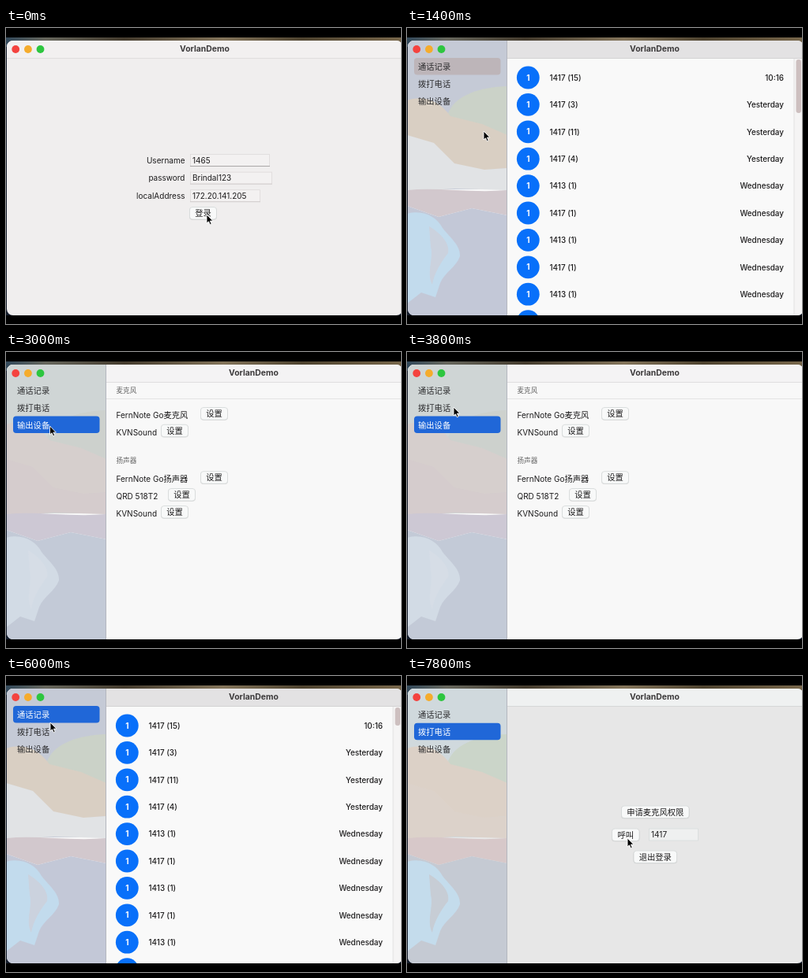
Animation of 500 by 376 pixels, one loop 8000 ms. Source, as an HTML page:

```html
<!DOCTYPE html>
<html lang="zh-CN">
<head>
<meta charset="utf-8">
<title>VorlanDemo</title>
<style>
  html, body { margin: 0; width: 100%; height: 100%; overflow: hidden; background: #000; }
  svg { display: block; width: 100%; height: 100%; }
  text { font: 10px Inter, "Noto Sans CJK SC", "Noto Sans CJK", sans-serif; fill: #1c1b1c; }
  .cjk { font-size: 10.3px; font-family: "Noto Sans CJK SC", "Noto Sans CJK", sans-serif; }
  .title { font-size: 10.4px; font-weight: 700; fill: #3c3a3b; text-anchor: middle; }
  .head { font-size: 8.6px; fill: #656565; }
  .mid { text-anchor: middle; }
  .end { text-anchor: end; }
  .row { font-size: 9.9px; font-weight: 500; }
  .badge { font-weight: 700; fill: #fff; text-anchor: middle; }
</style>
</head>
<body>
<svg viewBox="0 0 500 376" preserveAspectRatio="none">
  <defs>
    <linearGradient id="wall">
      <stop offset="0" stop-color="#32495b"/>
      <stop offset=".1" stop-color="#66665c"/>
      <stop offset=".3" stop-color="#443b2d"/>
      <stop offset=".55" stop-color="#83745a"/>
      <stop offset=".75" stop-color="#4e432f"/>
      <stop offset="1" stop-color="#77664a"/>
    </linearGradient>
    <clipPath id="frame"><rect x="1" y="16" width="501" height="349" rx="8"/></clipPath>
    <clipPath id="side"><rect x="1" y="16" width="125" height="349"/></clipPath>
  </defs>
  <rect width="500" height="376"/>
  <rect y="12" width="500" height="12" fill="url(#wall)"/>
  <rect y="24" width="500" height="341" fill="#141c2b"/>
  <g clip-path="url(#frame)">
    <g id="pages"></g>
    <g id="sidebar">
      <g id="scene" clip-path="url(#side)"></g>
      <rect x="126" y="16" width="1" height="349" fill="#b4b7bf"/>
      <rect id="pick" x="9" width="109.5" height="21.5" rx="4"/>
      <g id="menu"></g>
    </g>
    <circle cx="12.2" cy="27" r="4.9" fill="#f4433f"/>
    <circle cx="27.9" cy="27" r="4.9" fill="#f5ac2c"/>
    <circle cx="43.5" cy="27" r="4.9" fill="#2dc63f"/>
  </g>
  <path id="cursor" d="M0 0V11L2.5 8.8L4.3 12.8L6.2 12L4.4 8.1H7.9Z" fill="#000" stroke="#fff" stroke-width=".9" stroke-linejoin="round"/>
</svg>
<script>
const LOOP = 8000, STEP = 200;
const $ = id => document.getElementById(id);
const rect = (x, y, w, h, fill, more = '') =>
  `<rect x="${x}" y="${y}" width="${w}" height="${h}" fill="${fill}" ${more}/>`;
const text = (x, y, str, cls = '') => `<text x="${x}" y="${y}" class="${cls}">${str}</text>`;

const button = (x, y, w, label, id = '') =>
  rect(x, y + .8, w, 16, '#000', 'rx="4" opacity=".13"') +
  rect(x + .5, y + .5, w - 1, 15.5, '#f8f9f9', `rx="3.5" stroke="#d5d8d9" stroke-width=".8" ${id}`) +
  text(x + w / 2, y + 12, label, 'cjk mid');

const field = (x, y, w, value, fill, edge) =>
  rect(x + .5, y + .5, w - 1, 15, fill, `stroke="${edge}" stroke-width=".8"`) +
  text(x + 3, y + 11.6, value);

const shell = (bar, body, line, titleX) =>
  rect(1, 16, 500, 349, body) + rect(1, 16, 500, 22, bar) +
  rect(1, 38, 500, 1, line) + text(titleX, 30.4, 'VorlanDemo', 'title');

function loginPage() {
  const rows = [['Username', '1465', 101], ['password', 'Brindal123', 104], ['localAddress', '172.20.141.205', 89]];
  return shell('#f2f0f0', '#f0eeee', '#e0dede', 251.5) +
    rows.map(([name, value, w], i) => {
      const y = 160 + i * 22.6;
      return text(226.5, y + 11.6, name, 'end') + field(233, y, w, value, '#f3f1f1', '#dedada') +
        rect(233, y + 15, w, 1, i ? '#d2cece' : '#aaa7a7');
    }).join('') + button(232, 227, 35, '登录', 'id="login"');
}

function listPage() {
  const calls = [15, 3, 11, 4, 1, 1, 1, 1, 1, 1];
  return shell('#e3e2e3', '#f9f9f9', '#d3d2d3', 313.5) +
    calls.map((n, i) => {
      const y = 63 + i * 34.4;
      const who = i > 3 && i % 2 === 0 ? 1413 : 1417;
      const when = i === 0 ? '10:16' : i < 4 ? 'Yesterday' : 'Wednesday';
      return `<circle cx="153.3" cy="${y}" r="14.4" fill="#0870fa"/>` +
        text(153.3, y + 3.6, 1, 'badge') + text(180.5, y + 3.7, `${who} (${n})`, 'row') +
        text(477, y + 3.7, when, 'row end');
    }).join('') +
    rect(489.5, 39, 12, 326, '#f5f4f4') + rect(489.5, 39, 1, 326, '#e3e2e2') +
    rect(492.5, 40, 6.5, 68, '#cdbfbf', 'id="thumb" rx="3.2"');
}

const dialPage = () => shell('#eff1f1', '#e7e7e7', '#d5d7d7', 313.5) +
  button(271, 164.5, 86.5, '申请麦克风权限') + button(259, 193.5, 35.5, '呼叫') +
  field(306, 193.5, 63, '1417', '#eff0f0', '#d7dcdc') + button(286.5, 221.5, 55.5, '退出登录');

function devicePage() {
  const own = kind => `FernNote Go<tspan class="cjk">${kind}</tspan>`;
  const rows = [[84, own('麦克风'), 246], [105.7, 'KVNSound', 196], [165.2, own('扬声器'), 246],
    [187, 'QRD 518T2', 205], [209, 'KVNSound', 196]];
  return shell('#f4f3f4', '#f8f8f8', '#dfdedf', 313.5) + rect(127, 59, 374, 1, '#e3e3e3') +
    text(139.5, 52, '麦克风', 'cjk head') + text(139.5, 141, '扬声器', 'cjk head') +
    rows.map(([y, name, x]) => text(139.5, y, name) + button(x, y - 14, 35, '设置')).join('');
}

const pages = { login: loginPage(), list: listPage(), dial: dialPage(), device: devicePage() };
$('pages').innerHTML = Object.entries(pages).map(([k, v]) => `<g id="${k}">${v}</g>`).join('');
$('menu').innerHTML = ['通话记录', '拨打电话', '输出设备']
  .map((s, i) => text(14, 52.8 + i * 22, s, 'cjk')).join('');

// Soft landscape seen through the sidebar
const land = [
  'M0 16H127V205H0Z',
  'M127 74C95 75 62 84 52 108L60 124L127 148Z',
  'M0 92C24 84 42 94 55 112L95 122L127 136V178L82 182L42 166L0 150Z',
  'M0 136L34 146L60 172L98 180L127 178V206L60 204L0 208Z',
  'M0 206C40 202 82 210 127 206V238L82 229L40 240L0 226Z',
  'M0 226L40 240L82 229L127 238V365H0Z',
  'M0 236C20 230 38 240 45 254C54 266 68 276 67 290C62 304 48 310 42 324L36 342L18 336L0 350Z',
  'M28 252C42 260 55 274 52 286C44 296 34 312 32 326C24 312 34 292 30 278Z'
];
const tints = {
  list: ['#c5cad6', '#cbd2c8', '#d9cfc3', '#e1e3e5', '#d2c8cd', '#c3c8d7', '#c2dbed', '#cbd2de'],
  dial: ['#d0d9dd', '#cbd5c9', '#dcd1c7', '#dcd2ca', '#d7c8c9', '#c5cad3', '#c4dcec', '#c7cdd5'],
  late: ['#d3d1d4', '#cdd3c5', '#dad1ca', '#d9d4d1', '#d9dce4', '#c5cada', '#c4d9ed', '#c9cddb'],
  device: ['#cfd5d5', '#cdd1cd', '#d6cfcd', '#d5cccd', '#cdc8d4', '#c3cad7', '#d2dbe5', '#d6dde6']
};
$('scene').innerHTML = land.map(d => `<path d="${d}"/>`).join('');

// start time, page, selected item, sidebar tint
const states = [
  [0, 'login', 0, 'list'], [800, 'list', 0, 'list'], [2000, 'dial', 1, 'dial'],
  [3000, 'device', 2, 'device'], [4000, 'dial', 1, 'late'], [5200, 'dial', 0, 'late'],
  [5400, 'list', 0, 'list'], [6600, 'dial', 1, 'dial']
];
// time, x, y of the pointer tip
const path = [
  [0, 254, 237], [800, 254, 237], [1400, 97, 131], [2000, 49, 78], [2200, 49, 78],
  [2800, 55, 94], [3200, 56, 94], [3800, 59, 70], [4200, 59, 70], [5000, 60, 45],
  [5400, 60, 45], [6000, 56, 59], [6400, 55, 72], [6800, 55, 72], [7600, 279, 206], [8000, 279, 206]
];

function pointer(t) {
  const i = path.findIndex(p => p[0] > t);
  const [t0, x0, y0] = path[i - 1], [t1, x1, y1] = path[i];
  const u = (t - t0) / (t1 - t0), e = u * u * (3 - 2 * u);
  return [x0 + (x1 - x0) * e, y0 + (y1 - y0) * e];
}

function draw(time) {
  const t = Math.floor(time / STEP) * STEP;
  const [, page, sel, tint] = states.filter(s => s[0] <= t).pop();
  const grey = t < 2000;
  for (const k in pages) $(k).style.display = k === page ? '' : 'none';
  $('sidebar').style.display = page === 'login' ? 'none' : '';
  [...$('scene').children].forEach((p, i) => p.setAttribute('fill', tints[tint][i]));
  $('pick').setAttribute('y', 38 + sel * 21.8);
  $('pick').setAttribute('fill', grey ? '#bdb5b9' : '#2067d8');
  [...$('menu').children].forEach((m, i) => { m.style.fill = i === sel && !grey ? '#fff' : '#2b2b2d'; });
  $('thumb').setAttribute('height', t < 2000 ? 68 : 23);
  $('login').setAttribute('fill', t === 200 ? '#e6e4e4' : '#f8f9f9');
  $('cursor').setAttribute('transform', `translate(${pointer(t)})`);
}

const start = performance.now();
function tick() {
  draw((performance.now() - start) % LOOP);
  requestAnimationFrame(tick);
}
tick();
</script>
</body>
</html>
```
